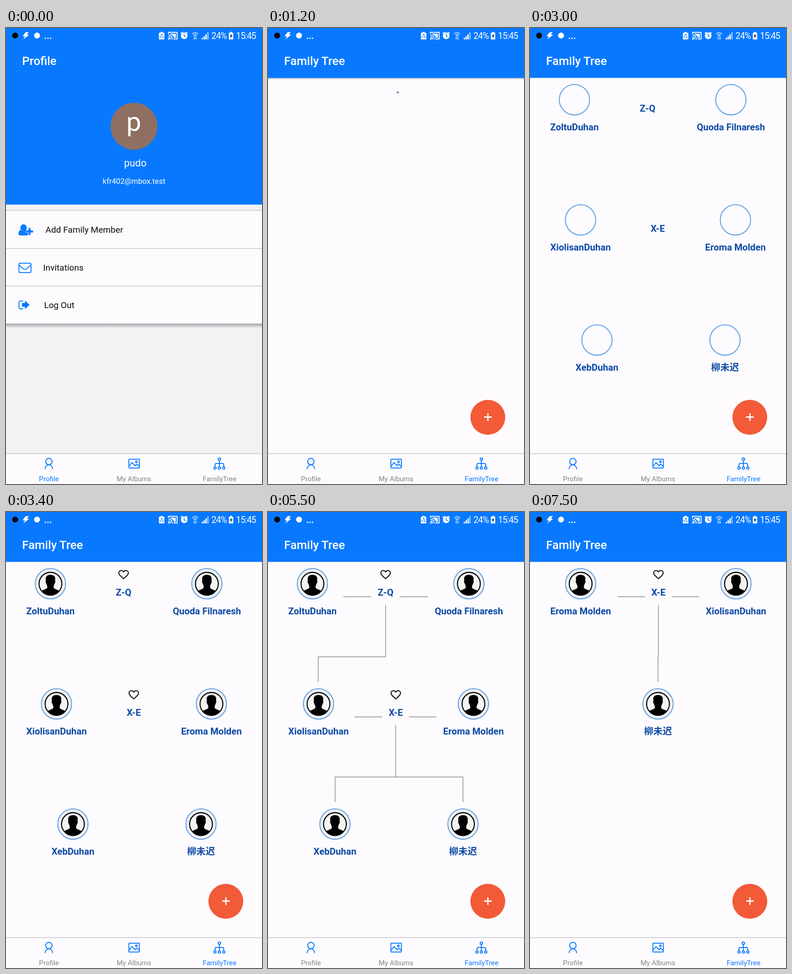
An HTML page for the animation above (8000 ms loop, 561x998 px).

```html
<!DOCTYPE html>
<html lang="en">
<head>
<meta charset="utf-8">
<title>Family app</title>
<style>
html, body { margin: 0; width: 100%; height: 100%; overflow: hidden; background: #fdfbfe; }
svg { display: block; width: 100%; height: 100%; font-family: Roboto, "Noto Sans CJK SC", "Noto Sans CJK JP", "Noto Sans CJK", sans-serif; }
.title { font-size: 25.9px; font-weight: 500; fill: #fff; }
.mid { text-anchor: middle; }
.item { font-size: 19.1px; fill: #0c0c0e; }
.tab { font-size: 15.2px; text-anchor: middle; }
.name { font-size: 20.46px; font-weight: 700; fill: #0b4aa5; text-anchor: middle; }
.clock { font-size: 19.5px; letter-spacing: -1px; fill: #fff; }
.icon { fill: none; stroke: #0879ff; stroke-width: 2; stroke-linejoin: round; }
.white { fill: none; stroke: #fff; }
.link { fill: none; stroke: #89888b; stroke-width: 1.4; }
</style>
</head>
<body>
<svg viewBox="0 0 561 998">
  <defs>
    <linearGradient id="shade" x1="0" y1="0" x2="0" y2="1">
      <stop offset="0" stop-color="#55555a" stop-opacity=".55"/>
      <stop offset="1" stop-color="#55555a" stop-opacity="0"/>
    </linearGradient>
    <clipPath id="disc"><circle r="25.5"/></clipPath>
    <g id="face">
      <circle r="32.4" fill="#f0f0f2"/>
      <circle r="25" fill="#f4f4f5" stroke="#050505" stroke-width="2.3"/>
      <path clip-path="url(#disc)" d="M-10-7C-12-16-7-19.500 0-19.500S12-16 10-7C11.200-6 10.500-1 9-0.500
        C8.500 2 7.500 4 7 5V9C9 12 17 13 21 17V28H-21V17C-17 13-9 12-7 9V5C-7.500 4-8.500 2-9-0.500C-10.500-1-11.200-6-10-7Z"/>
    </g>
    <path id="heart" fill="none" stroke="#1d1b20" stroke-width="2.3" stroke-linejoin="round"
      d="M0 9C-7.5 2.4-10.4 0-10.4-3.7C-10.4-6.8-8-8.9-5.3-8.9C-3-8.9-1-7.7 0-5.8C1-7.7 3-8.9 5.3-8.9C8-8.9 10.4-6.8 10.4-3.7C10.4 0 7.5 2.4 0 9Z"/>
  </defs>

  <rect width="561" height="998" fill="#fdfbfe"/>

  <g id="profile">
    <rect y="386" width="561" height="546" fill="#f2f1f4"/>
    <rect width="561" height="386.5" fill="#0879ff"/>
    <text class="title" x="35.2" y="81">Profile</text>
    <circle cx="280.5" cy="215" r="51.3" fill="#8f6f62"/>
    <text class="mid" x="280" y="225" font-size="58" fill="#fff">p</text>
    <text class="mid" x="283.3" y="303" font-size="21.9" fill="#fff">pudo</text>
    <text class="mid" x="280.5" y="340.5" font-size="16.7" fill="#fff">kfr402@mbox.test</text>
    <rect y="398" width="561" height="2" fill="#d6d5d8"/>
    <rect y="646" width="561" height="11" fill="url(#shade)"/>
    <rect y="400" width="561" height="247" fill="#fdfbfe"/>
    <path d="M0 482.5H561M0 564.5H561" stroke="#c6c5c9" stroke-width="1.4"/>
    <text class="item" x="86.6" y="448">Add Family Member</text>
    <text class="item" x="81.4" y="530.5">Invitations</text>
    <text class="item" x="83.4" y="613">Log Out</text>
    <g fill="#0879ff">
      <ellipse cx="38.5" cy="437" rx="7" ry="7.6"/>
      <path d="M32 441.5C29 443 27.3 446 27.3 450Q27.3 454 31 454H46.500Q48 454 48 452V448H43V443.500H45.500C44.500 442 42 441.500 42 441.500Q38 447 32 441.500Z"/>
      <path d="M49.300 437.500H53.700V443H59.300V447.500H53.700V453H49.300V447.500H43.800V443H49.300Z"/>
      <path d="M35 602H41.500V596.500L51.700 606L41.500 615.500V610H35Z"/>
    </g>
    <path class="icon" d="M37.500 597.500H32Q28.500 597.500 28.500 601V611Q28.500 614.700 32 614.700H37.500"/>
    <rect class="icon" x="28.300" y="514.800" width="26.500" height="20.500" rx="2.500"/>
    <path class="icon" d="M28.500 519C34 524 37 526.500 39.500 528Q41.500 529.200 43.500 528C46 526.500 49 524 54.600 519"/>
  </g>

  <g id="family">
    <rect id="shadow" y="108" width="561" height="5" fill="url(#shade)"/>
    <rect width="561" height="109.2" fill="#0879ff"/>
    <text class="title" x="35.2" y="81">Family Tree</text>
    <path id="spin" fill="none" stroke="#1b4c86" stroke-width="2.3" stroke-linecap="square"/>
    <g id="first"></g>
    <g id="second"></g>
    <circle cx="481.700" cy="852" r="38.200" fill="#f25a38"/>
    <path d="M473.500 851.500H490.300M481.900 843.200V859.900" stroke="#fff" stroke-width="2.800"/>
  </g>

  <g id="status">
    <circle cx="20" cy="16.500" r="6.500" fill="#060608"/>
    <path d="M42.500 9.500L50 8.500L46 14.500L50.500 15L38 25L41.500 18.500L36.500 18Z" fill="#fff"/>
    <circle cx="68" cy="16.500" r="6.500" fill="#fff"/>
    <path d="M85 22.500H88M90.500 22.500H93.500M96 22.500H99" stroke="#fff" stroke-width="2.600"/>
    <path d="M338.500 8.500H343.500V10.500H347V25H335V10.500H338.500Z" fill="#fff"/>
    <path d="M341 13.500L344.500 20H337.500Z" fill="none" stroke="#0879ff" stroke-width="1.600" stroke-dasharray="4.500 2"/>
    <path class="white" stroke-width="1.900" d="M356 13V9.500H375V24H367M356 15.500A9 9 0 0 1 364.500 25M356 19.500A5 5 0 0 1 360.500 25"/>
    <path d="M360 12.500H372V21.500H368.500A13 13 0 0 0 360 14Z" fill="#fff"/>
    <circle cx="356.800" cy="23.800" r="1.700" fill="#fff"/>
    <circle cx="390.500" cy="17" r="7.300" fill="#fff"/>
    <path fill="none" stroke="#0879ff" stroke-width="1.700" d="M390.500 12.500V17.500L394 19.500"/>
    <path class="white" stroke-width="1.900" d="M383 12L387 8.800M394 8.800L398 12"/>
    <g class="white" stroke-width="1.700">
      <path stroke-opacity=".65" d="M407.500 13Q414.500 6.500 421.500 13M409.800 15.500Q414.500 11 419.200 15.500"/>
      <path d="M412 18Q414.500 15.800 417 18M412.500 20V25M416.500 20V25"/>
    </g>
    <path d="M429 21.500H431.800V25H429ZM433 18H435.800V25H433ZM437 14H439.800V25H437Z" fill="#fff"/>
    <path d="M441 9H444V25H441Z" fill="#fff" fill-opacity=".55"/>
    <text class="clock" x="450.300" y="24.300">24%</text>
    <path d="M491 8.500H495.500V10.500H498V25H488.300V10.500H491Z" fill="#fff"/>
    <path d="M494.500 11.500L490 18.500H492.800L491.500 23.500L496.500 16.200H493.600Z" fill="#15386e"/>
    <text class="clock" x="504" y="24.300">15:45</text>
  </g>

  <g id="tabs">
    <rect y="931" width="561" height="67" fill="#fdfbfe"/>
    <path d="M0 931.500H561" stroke="#c4c3c7" stroke-width="1.300"/>
    <circle class="icon" cx="94" cy="948.800" r="7"/>
    <path class="icon" d="M85.700 965.500C86 952.800 102 952.800 102.300 965.500"/>
    <rect class="icon" x="269.300" y="943.800" width="23" height="19.300" rx="1"/>
    <path class="icon" stroke-width="1.800" d="M270 959L276 951L283 958L286.500 954.500L292 959.500"/>
    <circle class="icon" cx="285.800" cy="949.300" r="1.900" stroke-width="1.500"/>
    <path class="icon" stroke-width="2.300" d="M467.600 947V960M458 960V956Q458 953 461 953H474Q477.200 953 477.200 956V960"/>
    <g class="icon" stroke-width="1.800">
      <circle cx="467.600" cy="943.700" r="2.700"/>
      <circle cx="458" cy="963" r="2.600"/><circle cx="467.600" cy="963" r="2.600"/><circle cx="477.200" cy="963" r="2.600"/>
    </g>
    <text class="tab" id="tabProfile" x="94" y="992">Profile</text>
    <text class="tab" x="280.500" y="992" fill="#858488">My Albums</text>
    <text class="tab" id="tabTree" x="468" y="992">FamilyTree</text>
  </g>
</svg>
<script>
const LOOP = 8000, STEP = 100;
const $ = id => document.getElementById(id);

const person = (x, y, name) => `
  <use class="pic" href="#face" x="${x}" y="${y}"/>
  <circle cx="${x}" cy="${y}" r="33.2" fill="none" stroke="#5a9ee3" stroke-width="2"/>
  <text class="name" x="${x}" y="${y + 67.4}">${name}</text>`;
const couple = (x, y, label) => `
  <use class="pic" href="#heart" x="${x}" y="${y - 20}"/>
  <text class="name" x="${x}" y="${y + 26.4}">${label}</text>`;
const links = d => `<path class="link" d="${d}"/>`;

$('first').innerHTML =
  person(97.4, 157, 'ZoltuDuhan') + couple(257.7, 157, 'Z-Q') + person(440.2, 157, 'Quoda Filnaresh') +
  person(110.7, 420, 'XiolisanDuhan') + couple(280, 420, 'X-E') + person(450.2, 420, 'Eroma Molden') +
  person(146.7, 683, 'XebDuhan') + person(427.3, 683, '柳未迟') +
  links('M165 185.5H226.500M289 185.500H350.500M257.700 203V317H110V372') +
  links('M190 448.500H250.500M309 448.500H369M279.700 466V580M147 635V580H427.300V635');
$('second').innerHTML =
  person(111, 157, 'Eroma Molden') + couple(281.5, 157, 'X-E') + person(451.4, 157, 'XiolisanDuhan') +
  person(280.5, 420, '柳未迟') +
  links('M192 185.500H252M311 185.500H371M281.500 203V317H280.500V372');

const show = (el, on) => el.style.display = on ? '' : 'none';
const all = q => [...document.querySelectorAll(q)];
const pics = all('#first .pic'), firstLinks = all('#first .link'), secondLinks = all('#second .link');

// y of a bezier from (0,0) to (1,1) with control heights 0 and 1
function ease(x, x1, x2) {
  let lo = 0, hi = 1;
  for (let i = 0; i < 20; i++) {
    const m = (lo + hi) / 2, n = 1 - m;
    if (3 * x1 * m * n * n + 3 * x2 * m * m * n + m * m * m < x) lo = m; else hi = m;
  }
  return lo * lo * (3 - 2 * lo);
}

// Material style indeterminate arc: the head runs ahead, then the tail catches up
function arc(ms) {
  const p = ms % 1333 / 1333;
  const head = 0.75 * ease(Math.min(1, p * 2), 0.4, 0.2);
  const tail = 0.75 * ease(Math.max(0, p * 2 - 1), 0.4, 0.2);
  const turn = ms * 720 / 6665 + p * 90;
  const a = turn + tail * 360, b = turn + Math.max(head, tail + 0.01) * 360;
  const at = deg => {
    const r = deg * Math.PI / 180;
    return (280.8 + 10.8 * Math.sin(r)).toFixed(2) + ' ' + (151 - 10.8 * Math.cos(r)).toFixed(2);
  };
  return `M${at(a)}A10.8 10.8 0 ${b - a > 180 ? 1 : 0} 1 ${at(b)}`;
}

function draw(t) {
  const home = t < 1200, loading = t < 3000;
  show($('profile'), home);
  show($('family'), !home);
  show($('spin'), loading);
  show($('shadow'), loading);
  show($('first'), !loading && t < 6900);
  show($('second'), t >= 6900);
  if (!home && loading) $('spin').setAttribute('d', arc(80 + (t - 1200) * 0.805));
  const fade = Math.max(0, Math.min(1, (t - 3000) / 400));
  pics.forEach(el => el.style.opacity = fade);
  firstLinks.forEach(el => show(el, t >= 4000));
  secondLinks.forEach(el => show(el, t >= 7500));
  $('tabProfile').setAttribute('fill', home ? '#0879ff' : '#858488');
  $('tabTree').setAttribute('fill', home ? '#858488' : '#0879ff');
}

const start = performance.now();
function tick() {
  const t = (performance.now() - start) % LOOP;
  draw(Math.floor(t / STEP) * STEP);
  requestAnimationFrame(tick);
}
tick();
</script>
</body>
</html>
```
